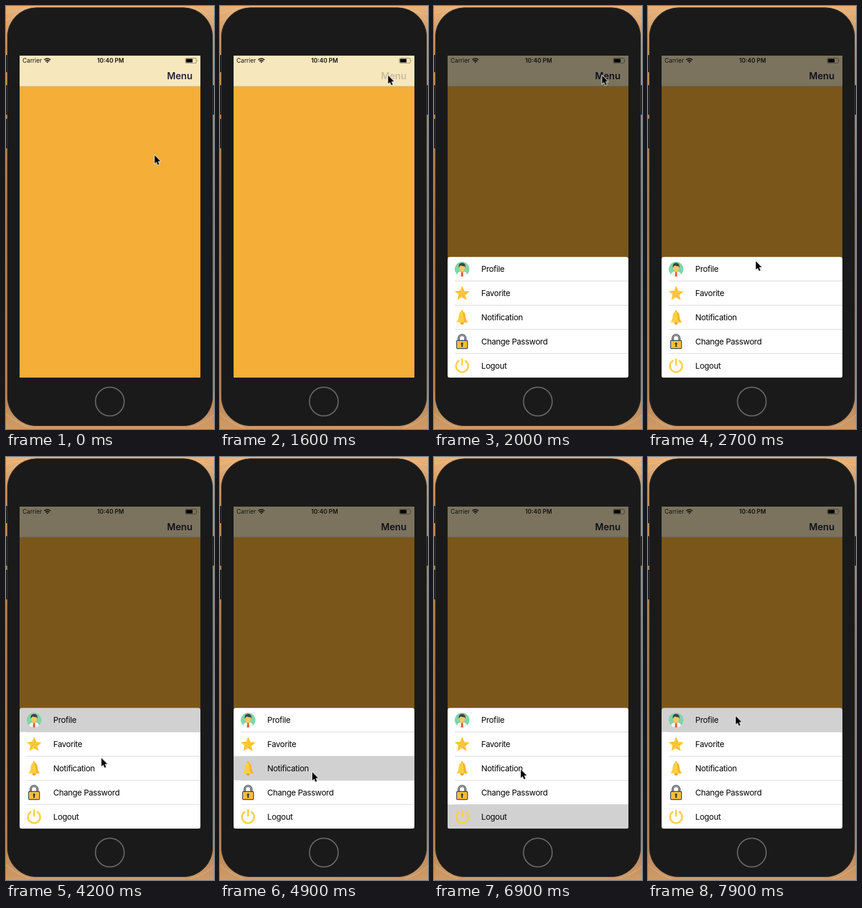
An HTML page for the animation above (8 s loop, 352 px wide and 716 px high).

```html
<!DOCTYPE html>
<html lang="en">
<head>
<meta charset="utf-8">
<title>Bottom menu</title>
<style>
html, body { margin: 0; width: 100%; height: 100%; overflow: hidden; background: #d6a26c; }
svg { display: block; width: 100vw; height: 100vh; }
text { font-family: Inter, "Liberation Sans", Arial, sans-serif; }
.status { font-size: 10px; fill: #111; }
.time { font-weight: 600; }
.menu { font-size: 15.7px; font-weight: 600; fill: #202133; animation: press 8s linear infinite; }
.label { font-size: 13.7px; letter-spacing: -.35px; fill: #000; }
.dim { animation: dim 8s linear infinite; }
.sheet { animation: rise 8s linear infinite; }
.cursor { animation: move 8s linear infinite; }
.pick { fill: #d1d1d1; opacity: 0; animation: 8s step-end infinite; }
.pick.p0 { animation-name: pick0; }
.pick.p2 { animation-name: pick2; }
.pick.p3 { animation-name: pick3; }
.pick.p4 { animation-name: pick4; }

@keyframes press {
  0%, 18.74% { opacity: 1; }
  18.75%, 20.625% { opacity: .22; }
  22.5% { opacity: .8; }
  23.5%, 100% { opacity: 1; }
}
@keyframes dim {
  0%, 20.625% { opacity: 0; animation-timing-function: ease; }
  24.375%, 100% { opacity: .5; }
}
@keyframes rise {
  0%, 20.625% { transform: translateY(206px); animation-timing-function: ease; }
  24.375%, 100% { transform: none; }
}
@keyframes move {
  0%, 5% { transform: translate(251.5px, 252.5px); animation-timing-function: ease-in-out; }
  16.25%, 25% { transform: translate(284.5px, 117.5px); animation-timing-function: ease-in-out; }
  33.75%, 35% { transform: translate(182.5px, 432px); animation-timing-function: ease-in-out; }
  40%, 47.5% { transform: translate(163px, 437px); animation-timing-function: ease-in-out; }
  52.5%, 58.75% { transform: translate(161.5px, 509.5px); animation-timing-function: ease-in-out; }
  64%, 67.5% { transform: translate(150px, 561px); animation-timing-function: ease-in-out; }
  71.25%, 81.25% { transform: translate(145.5px, 600.5px); animation-timing-function: ease-in-out; }
  92%, 100% { transform: translate(148.5px, 438.5px); }
}
@keyframes pick0 {
  0% { opacity: 0; }
  41.25% { opacity: 1; }
  55% { opacity: 0; }
  93.75%, 100% { opacity: 1; }
}
@keyframes pick2 {
  0% { opacity: 0; }
  55% { opacity: 1; }
  65%, 100% { opacity: 0; }
}
@keyframes pick3 {
  0% { opacity: 0; }
  65% { opacity: 1; }
  75%, 100% { opacity: 0; }
}
@keyframes pick4 {
  0% { opacity: 0; }
  75% { opacity: 1; }
  93.75%, 100% { opacity: 0; }
}
</style>
</head>
<body>
<svg viewBox="0 0 352 716" preserveAspectRatio="none">
  <defs>
    <linearGradient id="wood" x2="0" y2="1">
      <stop offset="0" stop-color="#e8b27b"/>
      <stop offset=".1" stop-color="#c2925f"/>
      <stop offset=".5" stop-color="#a0764d"/>
      <stop offset=".9" stop-color="#b08154"/>
      <stop offset="1" stop-color="#cf9b68"/>
    </linearGradient>
    <clipPath id="screen"><rect x="23" y="84" width="306" height="545"/></clipPath>
    <clipPath id="card"><rect x="23" y="424.7" width="306" height="204.3" rx="4"/></clipPath>
    <clipPath id="face"><circle r="12.5"/></clipPath>
  </defs>

  <!-- desk -->
  <rect width="352" height="716" fill="url(#wood)"/>
  <g fill="none" stroke="#f3c694" stroke-width="1.5" opacity=".35">
    <path d="M0 12Q22 8 40 0M0 24Q12 20 24 8M312 0Q330 12 352 14M330 4Q342 16 352 28"/>
    <path d="M0 690Q14 704 40 714M312 714Q338 706 352 692"/>
  </g>

  <!-- phone -->
  <g fill="#202020">
    <rect y="83" width="4" height="29"/>
    <rect y="134" width="4" height="50"/>
    <rect y="191" width="4" height="50"/>
    <rect x="348" y="134" width="4" height="50"/>
  </g>
  <rect x="2" y="2.5" width="348" height="708.5" rx="50" fill="#1a1a1a"/>
  <rect x="2.5" y="3" width="347" height="707.5" rx="49.5" fill="none" stroke="#333"/>
  <circle cx="175.7" cy="669.5" r="24.3" fill="none" stroke="#656565" stroke-width="2"/>

  <g clip-path="url(#screen)">
    <rect x="23" y="84" width="306" height="545" fill="#f5ae37"/>
    <rect x="23" y="84" width="306" height="52" fill="#f7e7bd"/>
    <rect x="23" y="135.5" width="306" height=".8" fill="#c9b98f"/>
    <text class="menu" x="315.5" y="124" text-anchor="end">Menu</text>
    <rect class="dim" x="23" y="84" width="306" height="545"/>

    <text class="status" x="28" y="96">Carrier</text>
    <text class="status time" x="177" y="96" text-anchor="middle">10:40 PM</text>
    <g fill="none" stroke="#111" stroke-width="1.7">
      <path d="M64.6 91.2Q70 86.4 75.4 91.2M66.7 93.5Q70 90.5 73.3 93.5"/>
      <path d="M68.3 94.7Q70 93.4 71.7 94.7L70 96.6Z" fill="#111" stroke="none"/>
    </g>
    <rect x="303.5" y="88.3" width="18.6" height="8.4" rx="2" fill="none" stroke="#000" stroke-opacity=".42"/>
    <rect x="304.7" y="89.5" width="11" height="6" rx=".8"/>
    <path d="M323.3 91.2q1.4 1.3 0 2.7z" opacity=".5"/>

    <g class="sheet">
      <g clip-path="url(#card)">
        <rect x="23" y="424" width="306" height="206" fill="#fff"/>
        <g id="rows"></g>
      </g>

      <!-- profile -->
      <g transform="translate(47.5 445.3)" clip-path="url(#face)">
        <circle r="12.5" fill="#7fd6a6"/>
        <path d="M-9 13Q-9 5 -3 4H3Q9 5 9 13Z" fill="#f4f4f2"/>
        <path d="M-2.5 2H2.5V5L0 7-2.5 5Z" fill="#efb04b"/>
        <path d="M-1.4 5.5H1.4L2 13H-2Z" fill="#e4573d"/>
        <ellipse cy="-2" rx="4.8" ry="6" fill="#fcc75f"/>
        <path d="M-5.4-2Q-7-10 0-10.5 7-10 5.4-2L4.2-5Q1-4.5-2-6L-4.3-4.6Z" fill="#3d4350"/>
      </g>
      <!-- favorite -->
      <g transform="translate(47.5 486.3)">
        <path d="M0-12.5 3.7-4.3 12.5-3.4 5.9 2.4 7.8 11.2 0 6.8-7.8 11.2-5.9 2.4-12.5-3.4-3.7-4.3Z" fill="#fdd042"/>
        <path d="M0-12.5 3.7-4.3 0 0ZM12.5-3.4 5.9 2.4 0 0ZM7.8 11.2 0 6.8V0ZM-7.8 11.2-5.9 2.4 0 0ZM-12.5-3.4-3.7-4.3 0 0Z" fill="#f4b62f" opacity=".75"/>
      </g>
      <!-- notification -->
      <g transform="translate(47.5 527)">
        <circle cy="9.2" r="3" fill="#eda62b"/>
        <circle cy="-10.2" r="1.8" fill="#f4b62f"/>
        <path d="M-9.5 8.5Q-6 4-5.7-2.5-5-9.5 0-9.7 5-9.5 5.7-2.5 6 4 9.5 8.5Z" fill="#fdd042"/>
        <path d="M1-9.6Q5-9 5.7-2.5 6 4 9.5 8.5H4Q2 0 1-9.6Z" fill="#f4b62f"/>
      </g>
      <!-- password -->
      <g transform="translate(47.5 568)">
        <path d="M-5.6-1V-5.5A5.6 5.8 0 0 1 5.6-5.5V-1" fill="none" stroke="#454b52" stroke-width="3.6"/>
        <path d="M-5.6-1V-5.5A5.6 5.8 0 0 1 5.6-5.5V-1" fill="none" stroke="#b9bec2" stroke-width="1.2"/>
        <rect x="-9.2" y="-1.7" width="18.4" height="13.4" rx="1.3" fill="#f6bd3a" stroke="#454b52" stroke-width="1.4"/>
        <path d="M0 1.6a2 2 0 0 1 1 3.7L1.5 8.8H-1.5L-1 5.3A2 2 0 0 1 0 1.6Z" fill="#333a42"/>
      </g>
      <!-- logout -->
      <g transform="translate(47.5 609)" fill="none" stroke="#fdd042" stroke-width="2.9" stroke-linecap="round">
        <path d="M-5.6-8.3A10.3 10.3 0 1 0 5.6-8.3M0-11V-1.5"/>
      </g>
    </g>
  </g>

  <g class="cursor">
    <path d="M0 0V14.2L3.2 11.3 5.4 16.5 7.8 15.5 5.6 10.3H10Z" stroke="#fff" stroke-width="1.8" stroke-linejoin="round" paint-order="stroke"/>
  </g>
</svg>
<script>
const labels = ["Profile", "Favorite", "Notification", "Change Password", "Logout"];
const top0 = 424.7, rowH = 40.86;
document.getElementById("rows").innerHTML = labels.map((label, i) => {
  const y = top0 + i * rowH;
  const line = i < labels.length - 1
    ? `<rect x="35" y="${y + rowH - .4}" width="294" height=".8" fill="#cfcfd2"/>` : "";
  return `${line}<rect class="pick p${i}" x="23" y="${y}" width="306" height="${rowH}"/>
    <text class="label" x="80" y="${y + 25.4}">${label}</text>`;
}).join("");
</script>
</body>
</html>
```
